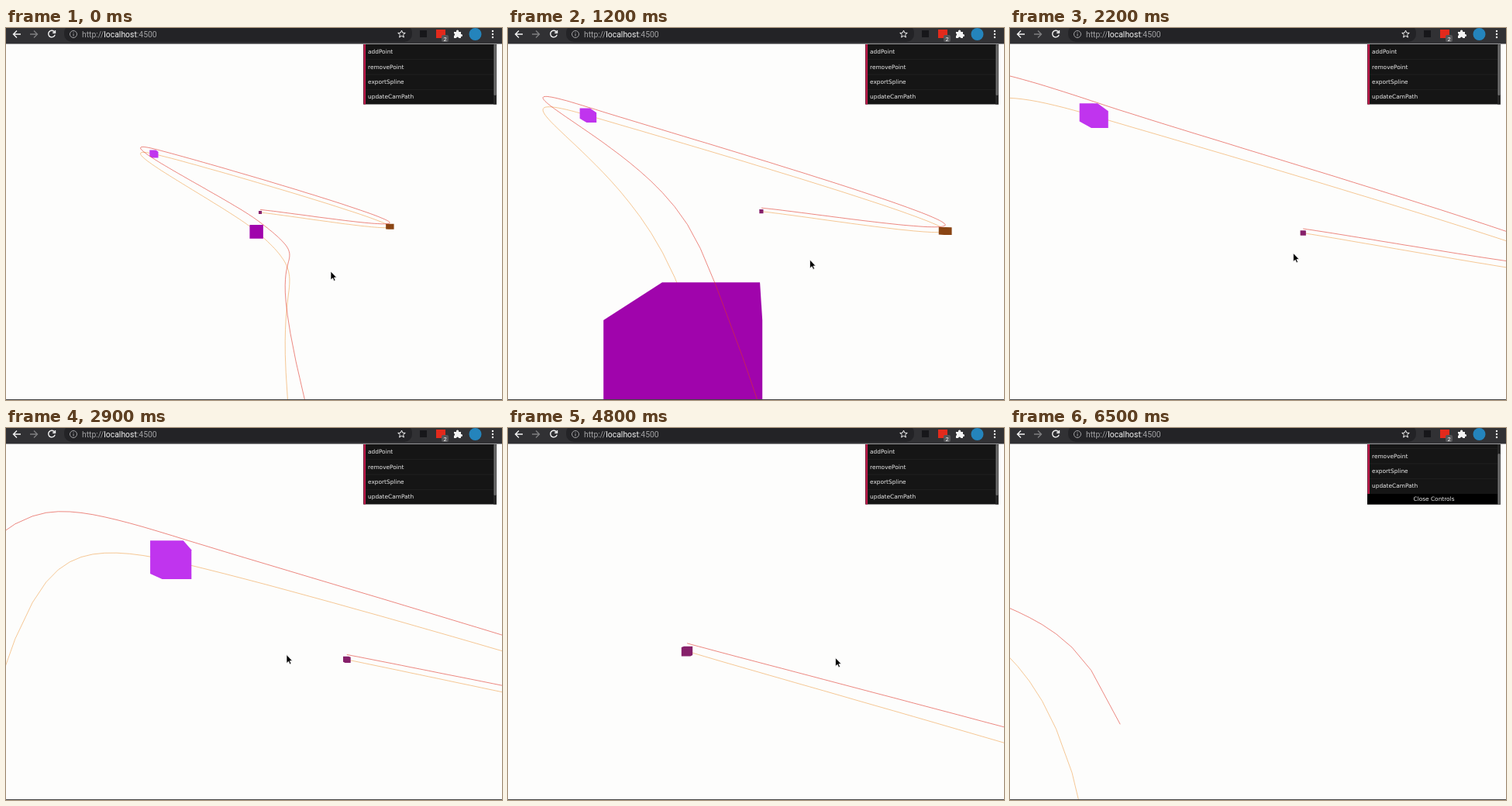
Animation, 640 px wide and 480 px high, one loop 6600 ms. Source, as an HTML page:

```html
<!DOCTYPE html>
<html lang="en">
<head>
<meta charset="utf-8">
<title>Spline editor</title>
<style>
  html, body { margin: 0; width: 100%; height: 100%; overflow: hidden; background: #fdfdfc; }
  svg { display: block; width: 640px; height: 480px; }
  .curve { fill: none; stroke-width: 1; stroke-opacity: .58; }
  .icon { fill: none; stroke: #f2f2f2; stroke-width: 1.4; }
  .grey { stroke: #a2a2a4; stroke-width: 1; }
  .url { font: 10.4px Roboto, sans-serif; fill: #a2a2a4; }
  .menu { font: 7.4px "DejaVu Sans", sans-serif; fill: #ececec; }
  .badge { font: 7.5px Roboto, sans-serif; fill: #fff; text-anchor: middle; }
</style>
</head>
<body>
<svg viewBox="0 0 640 480">
  <defs>
    <clipPath id="panel"><rect x="461" y="21" width="172" height="77.5"/></clipPath>
  </defs>
  <rect width="640" height="480" fill="#fdfdfc"/>

  <path id="lower" class="curve" stroke="#f0a04a"/>
  <path id="small" fill="#86206a"/>
  <path id="brown" fill="#8a4514"/>
  <path id="violet" fill="#c034ee"/>
  <path id="big" fill="#a004ac"/>
  <path id="upper" class="curve" stroke="#e03428"/>
  <rect y="479" width="640" height="1" fill="#444"/>

  <!-- browser bar -->
  <rect width="640" height="20.5" fill="#313134"/>
  <rect x="75" y="-4" width="449" height="22" rx="10" fill="#232326"/>
  <path class="icon" d="M19 8H9.5M14 3.5L9.5 8L14 12.5"/>
  <path class="icon" stroke-opacity=".4" d="M31 8H40.5M36 3.5L40.5 8L36 12.5"/>
  <path class="icon" d="M62.5 5A4.3 4.3 0 1 0 63.2 8.6M63.5 3V6.2H60.2"/>
  <g class="icon grey">
    <circle cx="87" cy="8" r="4.5"/>
    <path d="M87 7.3V10.5M87 5.3V6.3"/>
  </g>
  <text class="url" x="98" y="11.5">http://<tspan fill="#f4f4f4">localhost</tspan>:4500</text>
  <path id="star" class="icon" style="stroke-width:1"/>
  <rect x="534" y="3" width="9" height="9" fill="#17171a"/>
  <rect x="555" y="2" width="12" height="11" fill="#e32a1c"/>
  <rect x="562" y="9" width="9" height="9" rx="2" fill="#555558"/>
  <text class="badge" x="566.5" y="16.5">2</text>
  <path fill="#f4f4f4" d="M578 5H581V4A1.6 1.6 0 0 1 584.2 4V5H587V8H587.6A1.5 1.5 0 0 1 587.6 11H587V13H584.2A1.6 1.6 0 0 0 581 13H578V10A1.6 1.6 0 0 0 578 7Z"/>
  <circle cx="605.5" cy="8" r="8" fill="#2484bc"/>
  <g fill="#f4f4f4">
    <circle cx="628" cy="4" r="1.2"/><circle cx="628" cy="8" r="1.2"/><circle cx="628" cy="12" r="1.2"/>
  </g>

  <!-- controls -->
  <g clip-path="url(#panel)">
    <rect x="461" y="21" width="172" height="78" fill="#151515"/>
    <g id="rows" class="menu">
      <rect x="461.5" y="20" width="2.5" height="79" fill="#c01c4c"/>
      <path d="M464 40.5H629M464 60H629M464 79.5H629" stroke="#262626" stroke-width=".6"/>
      <text x="467" y="33">addPoint</text>
      <text x="467" y="52.5">removePoint</text>
      <text x="467" y="72">exportSpline</text>
      <text x="467" y="91">updateCamPath</text>
      <rect x="461" y="99" width="168" height="14" fill="#000"/>
      <text x="547" y="108" text-anchor="middle">Close Controls</text>
    </g>
    <rect x="629" y="21" width="4" height="78" fill="#262626"/>
    <rect id="thumb" x="629.5" y="21" width="3" height="66" rx="1.5" fill="#6c6c6c"/>
  </g>

  <path id="cursor" d="M0 0V11L2.6 8.7L4.3 12.4L6 11.6L4.4 8H7.6Z" fill="#000" stroke="#fff" stroke-width=".7"/>
</svg>

<script>
const LOOP = 6600, STEP = 100;
const FOCAL = 328, CENTER = [320, 250];
const LIFT = .9;        // height of the upper curve above the lower one
const PARTS = 40;       // straight pieces per curve segment
const $ = id => document.getElementById(id);

// World: x right, y down, z into the screen
const cubes = {
  small:  { pos: [2, -3, 82], size: 1 },
  brown:  { pos: [31, 1.1, 58], size: 1.2 },
  violet: { pos: [-17.7, -12, 45], size: 1.1 },
  big:    { pos: [.18, .74, 19.3], size: 1 }
};
const knots = [...Object.values(cubes).map(c => c.pos), [.3, 2, 1]];

// Keys are [time, ...values]
const flight = [
  [0, 0, 0, 0], [1200, .64, -.38, 17.2], [2200, -7.4, -5.35, 29], [2900, -14.8, -9.85, 36],
  [3500, -18.45, -12, 43], [3800, -13.3, -12.6, 47], [4800, 9.86, -6.36, 53],
  [5600, 20.5, -3, 55.3], [6200, 31, .1, 58.5], [6500, 30.55, .2, 61.4]
];
const pointer = [
  [0, 419, 314], [1200, 389.5, 299], [2200, 365.5, 290.5], [2900, 362, 292.5], [3800, 398, 343.5],
  [4800, 422.5, 296.5], [5600, 440, 270], [5900, 510, 60], [6300, 560, -30]
];
const scroll = [[5800, 0], [6200, 14]];

const hermite = (a, b, da, db, u) => {
  const w = 1 - u;
  return a * (1 + 2 * u) * w * w + da * u * w * w + b * u * u * (3 - 2 * u) - db * u * u * w;
};

// Monotone cubic through the keys
function at(keys, t) {
  const last = keys.length - 1;
  if (t >= keys[last][0]) return keys[last].slice(1);
  const k = Math.max(0, keys.findIndex(key => key[0] > t) - 1);
  const a = keys[k], b = keys[k + 1], h = b[0] - a[0], u = Math.max(0, (t - a[0]) / h);
  const rate = (n, i) => (keys[n + 1][i] - keys[n][i]) / (keys[n + 1][0] - keys[n][0]);
  const slope = (n, i) => {
    const p = rate(Math.max(n - 1, 0), i), q = rate(Math.min(n, last - 1), i);
    return p * q > 0 ? 2 * p * q / (p + q) : 0;
  };
  return a.slice(1).map((v, j) =>
    hermite(v, b[j + 1], slope(k, j + 1) * h, slope(k + 1, j + 1) * h, u));
}

// Uniform Catmull-Rom through the knots, extended straight at both ends
function samplePath() {
  const beyond = (end, inner) => end.map((v, i) => 2 * v - inner[i]);
  const p = [beyond(knots[0], knots[1]), ...knots, beyond(knots.at(-1), knots.at(-2))];
  const out = [];
  for (let s = 0; s <= (knots.length - 1) * PARTS; s++) {
    const n = Math.min(Math.floor(s / PARTS), knots.length - 2), u = s / PARTS - n;
    const [o, a, b, c] = p.slice(n, n + 4);
    out.push(a.map((v, i) => hermite(v, b[i], (b[i] - o[i]) / 2, (c[i] - v) / 2, u)));
  }
  return out;
}
const path = samplePath();

const project = (p, cam) => {
  const z = p[2] - cam[2];
  return [0, 1].map(i => CENTER[i] + (p[i] - cam[i]) / z * FOCAL);
};

// Only the parts in front of the camera are drawn
function curve(cam, lift) {
  let d = "", pen = "M";
  for (const [x, y, z] of path) {
    if (z - cam[2] < .15) { pen = "M"; continue; }
    d += pen + project([x, y - lift, z], cam).map(v => v.toFixed(1));
    pen = "L";
  }
  return d;
}

function hull(points) {
  const sorted = points.sort((a, b) => a[0] - b[0] || a[1] - b[1]);
  const half = list => {
    const h = [];
    for (const p of list) {
      while (h.length > 1) {
        const [a, b] = h.slice(-2);
        if ((b[0] - a[0]) * (p[1] - a[1]) > (b[1] - a[1]) * (p[0] - a[0])) break;
        h.pop();
      }
      h.push(p);
    }
    return h.slice(0, -1);
  };
  return [...half(sorted), ...half([...sorted].reverse())];
}

function outline({ pos, size }, cam) {
  if (pos[2] - cam[2] < 1.1) return "";
  const corners = [], sides = [-size / 2, size / 2];
  for (const x of sides) for (const y of sides) for (const z of sides)
    corners.push(project([pos[0] + x, pos[1] + y, pos[2] + z], cam));
  return "M" + hull(corners).join("L") + "Z";
}

$("star").setAttribute("d", "M" + Array.from({ length: 10 }, (_, i) => {
  const r = i % 2 ? 2.2 : 5, a = i * Math.PI / 5;
  return [510.5 + r * Math.sin(a), 8 - r * Math.cos(a)];
}).join("L") + "Z");

function draw(t) {
  const cam = at(flight, t);
  $("lower").setAttribute("d", curve(cam, 0));
  $("upper").setAttribute("d", curve(cam, LIFT));
  for (const id in cubes) $(id).setAttribute("d", outline(cubes[id], cam));

  $("cursor").setAttribute("transform", `translate(${at(pointer, t)})`);
  const [s] = at(scroll, t);
  $("rows").setAttribute("transform", `translate(0 ${-s})`);
  $("thumb").setAttribute("y", 21 + s * 12 / 14);
}

const begin = performance.now();
function tick() {
  const t = (performance.now() - begin) % LOOP;
  draw(Math.floor(t / STEP) * STEP);
  requestAnimationFrame(tick);
}
tick();
</script>
</body>
</html>
```
